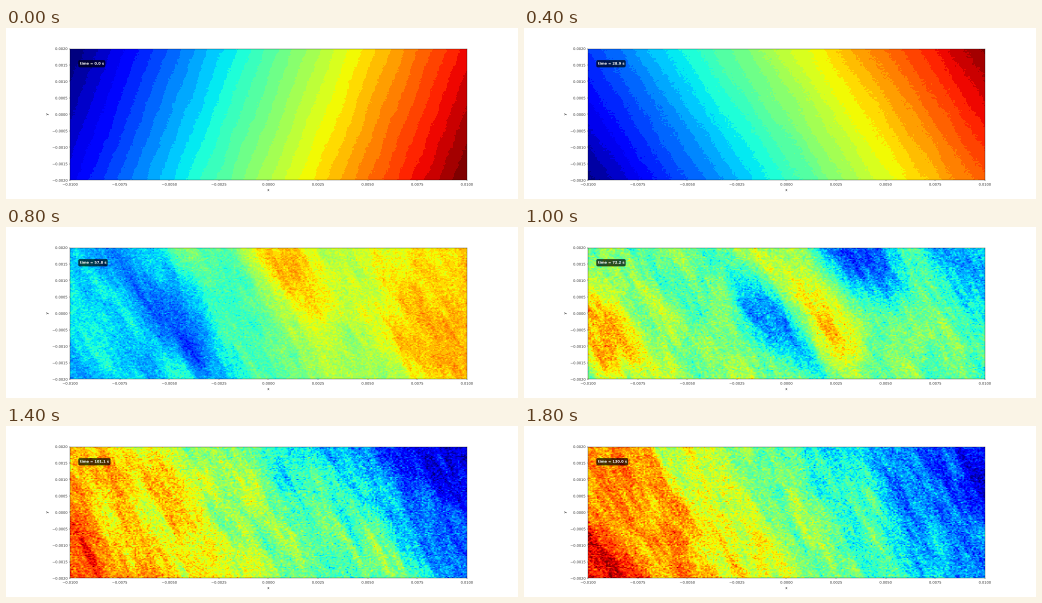
A matplotlib script for the animation above (2 s loop, 512 by 171 pixels).

```python
import numpy as np
import matplotlib.pyplot as plt
from matplotlib.animation import FuncAnimation
from matplotlib.patheffects import Normal

DPI = 25.6
STEPS, END_TIME = 10, 130.0
NX, NY = 264, 120
CELL_W, CELL_H = 397 / NX, 132 / NY

x = np.linspace(0, 1, NX)
down = np.linspace(0, 1, NY)[:, None]

# Passing eddies: peak step, x, distance down, strength
EDDIES = [
    (4, .29, .65, -.17), (4, .12, .05, -.13), (4, .55, .10, .14), (4, .92, .80, .10),
    (5, .03, .55, .20), (5, .45, .55, -.27), (5, .57, .50, .18), (5, .67, .05, -.30),
    (5, .93, .15, -.14), (7, .86, .10, -.14), (7, .80, .75, .12),
]


def ramp(step):
    """Tilted gradient that flips from rising to falling."""
    tilt = .346 * np.exp(-4 * step) - .22
    slope = .12 + .88 * np.tanh(.7 * (4.6 - step))
    return .5 + slope * (x - .5 + tilt * (down - .5)) / (1 + abs(tilt))


def eddy(step, peak, cx, cy, strength):
    """Slanted blob that swells and fades around its peak step."""
    across = (x - cx - .2 * (down - cy)) / .06
    along = (down - cy) / .28
    fade = np.exp(-1.5 * (step - peak) ** 2)
    return strength * fade * np.exp(-(across ** 2 + along ** 2) / 2)


def streaks(rng, length, width):
    """Unit-variance noise stretched along a steep falling diagonal."""
    kx = 2 * np.pi * np.fft.fftfreq(NX, CELL_W)
    ky = 2 * np.pi * np.fft.fftfreq(NY, CELL_H)[:, None]
    along, across = .5 * kx + .87 * ky, .87 * kx - .5 * ky
    mask = np.exp(-((along * length) ** 2 + (across * width) ** 2) / 2)
    noise = np.fft.ifft2(np.fft.fft2(rng.normal(size=(NY, NX))) * mask).real
    return noise / noise.std()


def field(step):
    rng = np.random.default_rng(40 + step)
    rough = (rng.normal(size=(NY, NX))
             + .5 * streaks(rng, 10, 2)
             + .6 * streaks(rng, 25, 7))
    grain = .002 + .052 / (1 + np.exp(1.6 * (3.8 - step)))
    eddies = sum(eddy(step, *e) for e in EDDIES)
    return np.clip(ramp(step) + eddies + grain * rough, 0, 1)


def tick_text(value, _):
    return f"{value:.4f}".replace("-", "\u2212")


fields = [field(step) for step in range(STEPS)]

fig, ax = plt.subplots(figsize=(512 / DPI, 171 / DPI), dpi=DPI)
image = ax.imshow(fields[0], cmap=plt.get_cmap("jet", 32), vmin=0, vmax=1,
                  extent=(-.01, .01, -.002, .002), aspect="auto",
                  interpolation="bilinear")
ax.set_xticks(np.linspace(-.01, .01, 9))
ax.set_yticks(np.linspace(-.002, .002, 9))
ax.xaxis.set_major_formatter(tick_text)
ax.yaxis.set_major_formatter(tick_text)
ax.tick_params(labelcolor="0.2")
ax.set_xlabel("x")
ax.set_ylabel("y", labelpad=9)

clock = ax.text(.025, .9, "", color="white", fontsize=10, weight="bold",
                va="top", transform=ax.transAxes,
                bbox=dict(boxstyle="round,pad=0.4", facecolor="black",
                          edgecolor="black", alpha=.7))

# Drawing text as outlines keeps tiny glyphs at sub-pixel positions
labels = ax.get_xticklabels() + ax.get_yticklabels()
for text in labels + [ax.xaxis.label, ax.yaxis.label, clock]:
    text.set_path_effects([Normal()])


def draw(step):
    image.set_data(fields[step])
    clock.set_text(f"time = {END_TIME * step / (STEPS - 1):.1f} s")
    return image, clock


anim = FuncAnimation(fig, draw, frames=STEPS, interval=200,
                     repeat=True, repeat_delay=0)
plt.show()
```
